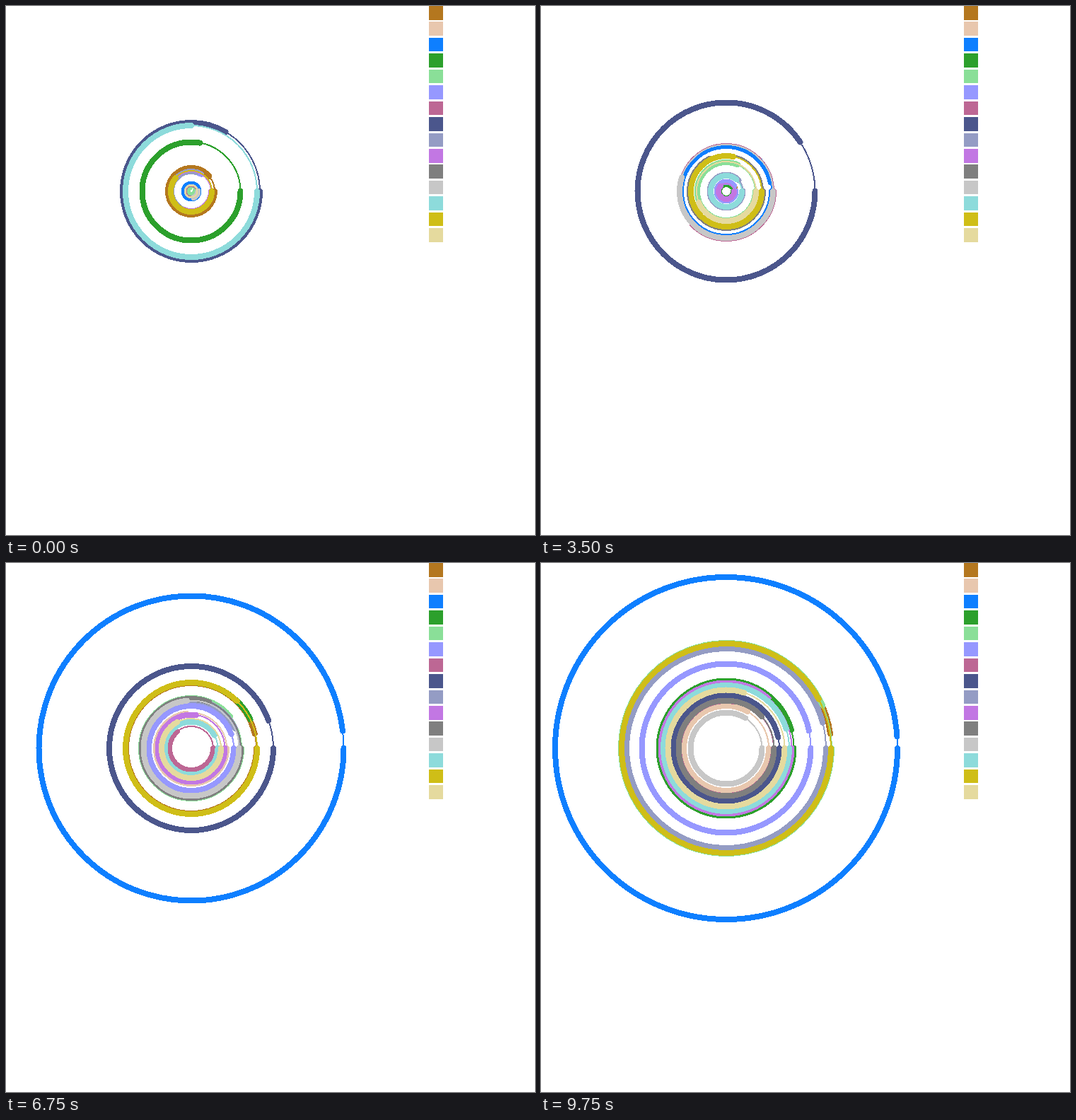
An HTML page that plays this animation: 748x748 px, repeating every 10000 ms.

```html
<!DOCTYPE html>
<html lang="en">
<head>
<meta charset="utf-8">
<title>Growing rings</title>
<style>
  html, body { margin: 0; width: 100%; height: 100%; overflow: hidden; background: #fff; }
  svg { display: block; width: 100vw; height: 100vh; shape-rendering: crispEdges; }
  circle { fill: none; stroke-linecap: round; }
</style>
</head>
<body>
<svg id="stage" viewBox="0 0 748 748"></svg>
<script>
const LOOP = 10000, STEP = 250, LAST = LOOP - STEP;
const CENTER = 262, PITCH = 22.44;
const stops = [0, 1750, 3500, 6750, LAST];
const stage = document.getElementById('stage');
const rings = [];

function add(tag, attributes) {
  const node = document.createElementNS('http://www.w3.org/2000/svg', tag);
  for (const name in attributes) node.setAttribute(name, attributes[name]);
  return stage.appendChild(node);
}

// finalGap: degrees still open at the end; radii: one waypoint per stop
function addRing(color, finalGap, ...radii) {
  add('rect', { x: 598, y: PITCH * rings.length, width: 19.6, height: 19.6, fill: color });
  const circle = width => add('circle',
    { cx: CENTER, cy: CENTER, stroke: color, 'stroke-width': width, pathLength: 360 });
  rings.push({ finalGap, radii, track: circle(2), arc: circle(8) });
}

addRing('#b4771f', 8, 33, 30, 13, 92, 148.5);
addRing('#e8c7ae', 60, 10, 32, 50, 50, 60);
addRing('#0e7fff', 4, 10.5, 31, 64, 215.5, 242);
addRing('#2ca02c', 16, 69.5, 17.5, 10, 93, 95.5);
addRing('#8adf98', 24, 5.5, 61.5, 41, 71, 149);
addRing('#9698ff', 12, 28, 17.5, 13.5, 60, 119.5);
addRing('#bd6794', 80, 7.5, 43, 67, 31, 67);
addRing('#4b568c', 12, 97, 11, 125.5, 116, 75);
addRing('#949cc4', 15, 28, 9, 23.5, 68, 141);
addRing('#c277e3', 50, 28, 7, 11, 47.5, 92.5);
addRing('#7f7f7f', 42, 29, 32, 52, 70, 67.5);
addRing('#c7c7c7', 58, 9.5, 34, 66, 67.5, 50.5);
addRing('#8ddbdb', 18, 93, 48.5, 22, 37.5, 89);
addRing('#cfbe17', 28, 29, 32, 50, 93, 148);
addRing('#e5da9e', 72, 8.5, 22.5, 42, 42, 82.5);

function radiusAt(radii, time) {
  const next = Math.max(1, stops.findIndex(stop => stop >= time));
  const from = stops[next - 1], progress = (time - from) / (stops[next] - from);
  return radii[next - 1] + (radii[next] - radii[next - 1]) * progress;
}

function draw(time) {
  // Every gap shrinks to a fifth over the loop
  const opening = 5 ** (1 - time / LAST);
  for (const { finalGap, radii, track, arc } of rings) {
    const radius = radiusAt(radii, time), sweep = 360 - finalGap * opening;
    track.setAttribute('r', radius);
    arc.setAttribute('r', radius);
    arc.setAttribute('stroke-dasharray', `${Math.max(0, sweep)} 400`);
    arc.setAttribute('visibility', sweep > 0 ? 'visible' : 'hidden');
  }
}

const start = performance.now();
function tick() {
  const time = (performance.now() - start) % LOOP;
  draw(Math.floor(time / STEP) * STEP);
  requestAnimationFrame(tick);
}
tick();
</script>
</body>
</html>
```
